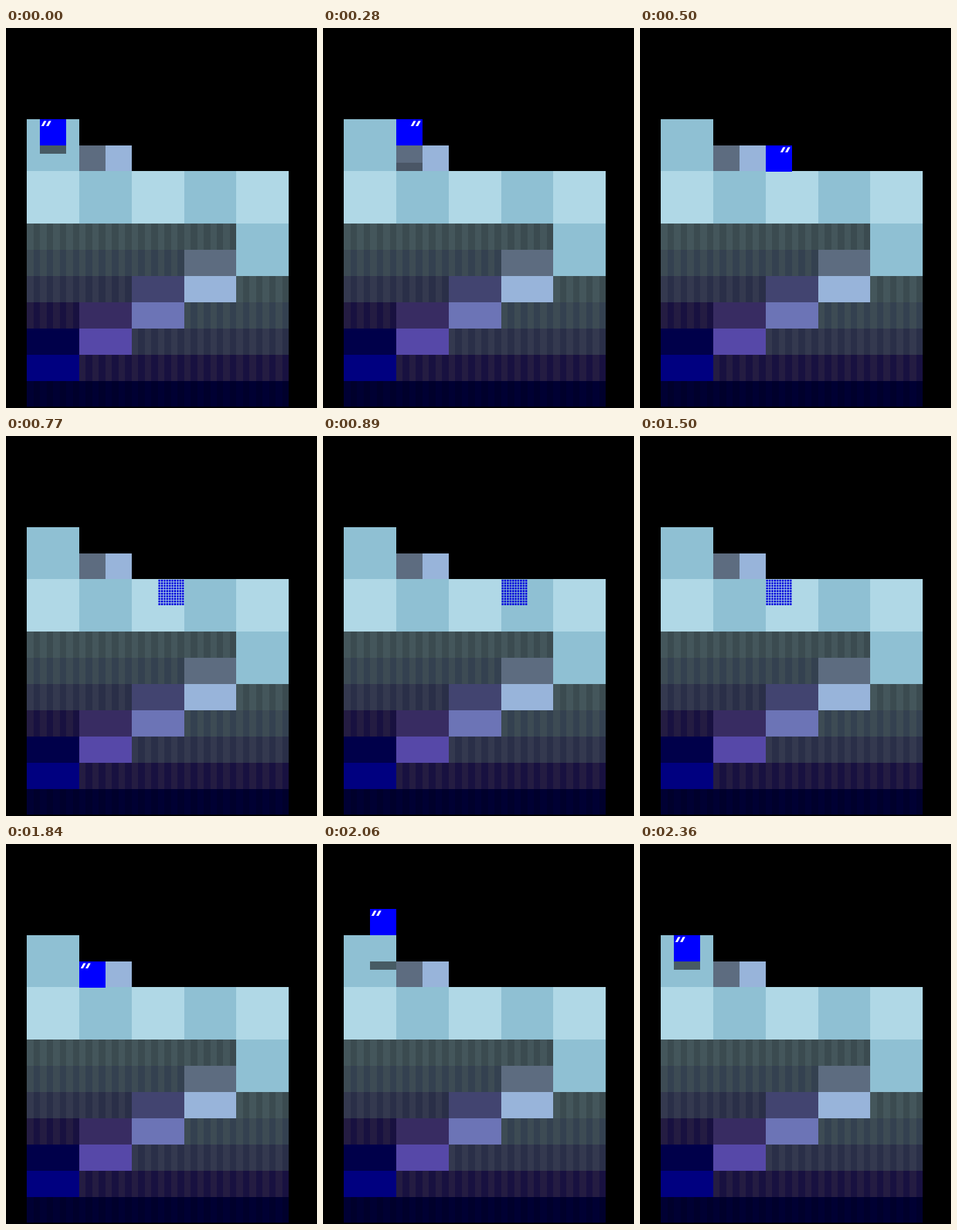
An HTML page with a canvas that plays this animation: 450 by 550 pixels, repeating every 2.39 s.

```html
<!DOCTYPE html>
<html lang="en">
<head>
<meta charset="utf-8">
<style>
html, body { margin: 0; width: 100%; height: 100%; overflow: hidden; background: #000; }
canvas { display: block; }
</style>
</head>
<body>
<canvas id="stage" width="450" height="550"></canvas>
<script>
const ctx = document.getElementById('stage').getContext('2d');
const LOOP = 2390, TICK = 70, TURN = 1030;
const UNIT = 37.9;
const HOME = 0.5;
const px = u => Math.round(30.2 + u * UNIT);
const py = v => Math.round(131.6 + v * UNIT);

const pale = '#b0d8e6', water = '#8fc0d3';
const stairs = [
  { top: '#5d6c80', front: '#98b4da' },
  { top: '#424470', front: '#6c74b6' },
  { top: '#382c62', front: '#5648a8' },
  { top: '#00004a', front: '#000080' }
];
const walls = [
  ['#44565b', '#3b4b50'],
  ['#3d4b54', '#344150'],
  ['#34394f', '#2a2f48'],
  ['#241c42', '#181140']
];
const floorPair = ['#000033', '#00002c'];

function block(u, v, w, h, color) {
  ctx.fillStyle = color;
  ctx.fillRect(px(u), py(v), px(u + w) - px(u), py(v + h) - py(v));
}

function stripes(from, to, v, pair) {
  for (let u = from; u < to; u += 0.25) block(u, v, 0.25, 1, pair[(u * 4) % 2]);
}

function drawScene() {
  ctx.fillStyle = '#000';
  ctx.fillRect(0, 0, 450, 550);
  block(0, 0, 2, 2, water);
  block(2, 1, 1, 1, stairs[0].top);
  block(3, 1, 1, 1, stairs[0].front);
  for (let i = 0; i < 5; i++) block(i * 2, 2, 2, 2, i % 2 ? water : pale);
  block(8, 4, 2, 2, water);

  // Each stair sits one row lower and two columns further left
  stairs.forEach(({ top, front }, i) => {
    const u = 6 - i * 2;
    stripes(0, u + 2, 4 + i, walls[i]);
    stripes(u + 2, 10, 6 + i, walls[i]);
    block(u, 5 + i, 2, 1, top);
    block(u, 6 + i, 2, 1, front);
  });
  stripes(0, 10, 10, floorPair);
  ctx.fillStyle = '#000';
  ctx.fillRect(0, 548, 450, 2);
}

// Walks right down the steps, turns, climbs back and hops onto the ledge
function poseAt(time) {
  const t = Math.floor(time / TICK) * TICK;
  const out = t < TURN;
  const u = Math.max(HOME, Math.round(7.03 - Math.abs(t - TURN) / 156));
  let v = Math.max(0, Math.floor((out ? u - 1 : u) / 2));
  if (!out && u === 1) v = -1;
  return { u, v, right: out && u > HOME };
}

function drawMesh(x, y) {
  const pitch = UNIT / 10;
  ctx.fillStyle = '#0000dc';
  for (let r = 0; r < 10; r++)
    for (let c = 0; c < 10; c++)
      ctx.fillRect(x + 0.5 + c * pitch, y + 0.9 + r * pitch, 2.8, 2.8);
}

function drawShadow(u, x) {
  if (u >= 4) return;
  const onLedge = u < 2;
  ctx.fillStyle = onLedge ? '#475b64' : '#4a5666';
  ctx.fillRect(x, onLedge ? 170 : 195, 38, 12);
}

function drawEyes(x, y) {
  ctx.fillStyle = '#fff';
  for (const ex of [x, x + 7]) {
    ctx.beginPath();
    ctx.moveTo(ex, y + 10);
    ctx.lineTo(ex + 4, y + 2.5);
    ctx.lineTo(ex + 7.5, y + 2.5);
    ctx.lineTo(ex + 3.5, y + 10);
    ctx.fill();
  }
}

function drawCube(time) {
  const { u, v, right } = poseAt(time);
  const x = px(u), y = py(v);
  if (v >= 2) return drawMesh(x, y);
  drawShadow(u, x);
  ctx.fillStyle = '#00f';
  ctx.fillRect(x, y, 38, 38);
  drawEyes(x + (right ? 21 : 2), y);
}

const start = performance.now();
function frame() {
  drawScene();
  drawCube((performance.now() - start) % LOOP);
  requestAnimationFrame(frame);
}
frame();
</script>
</body>
</html>
```
